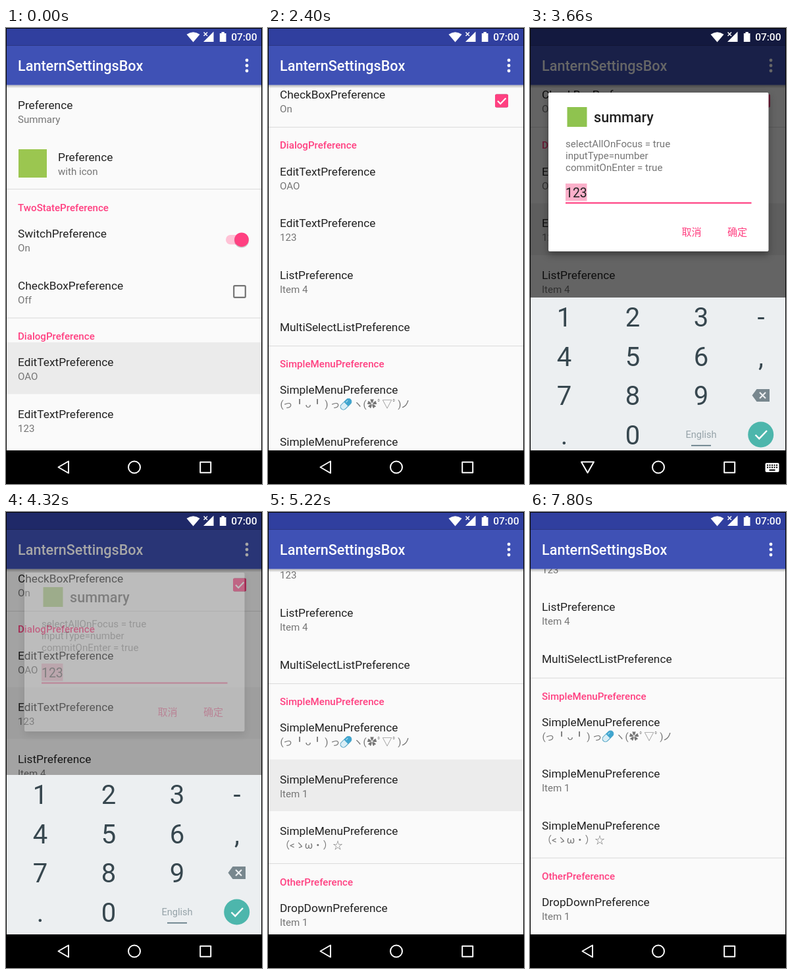
An HTML page for the animation above (8 s loop, 389 by 692 pixels).

```html
<!DOCTYPE html>
<html lang="en">
<head>
<meta charset="utf-8">
<title>Settings list</title>
<style>
html, body { margin: 0; width: 100%; height: 100%; overflow: hidden; background: #000; }
svg { display: block; }
text { font-family: Roboto, "Noto Sans CJK SC", "Noto Sans CJK JP", "DejaVu Sans", sans-serif; font-size: 15.1px; }
.title { font-size: 17.3px; fill: #212121; }
.sum { fill: #757575; }
.cat { font-weight: 500; fill: #ff4081; }
.head { font-size: 21.6px; font-weight: 500; }
.mid { text-anchor: middle; }
.key { font-size: 40px; fill: #37474f; text-anchor: middle; }
.lifted { filter: drop-shadow(0 5px 6px rgba(0,0,0,.35)); }
.menu { filter: drop-shadow(0 1px 2px rgba(0,0,0,.35)); }
</style>
</head>
<body>
<svg id="stage" width="389" height="692" viewBox="0 0 389 692"></svg>
<script>
const NS = 'http://www.w3.org/2000/svg';
const LOOP = 8000, STEP = 60, PINK = '#ff4081', ROW = 78.5;
const stage = document.getElementById('stage');

function set(node, attrs) {
  for (const k in attrs) node.setAttribute(k, attrs[k]);
  return node;
}
function add(parent, tag, attrs = {}, content) {
  const node = set(document.createElementNS(NS, tag), attrs);
  if (content !== undefined) node.textContent = content;
  parent.appendChild(node);
  return node;
}
const group = (parent, attrs) => add(parent, 'g', attrs);
const rect = (parent, x, y, width, height, fill, more) =>
  add(parent, 'rect', { x, y, width, height, fill, ...more });
const circle = (parent, cx, cy, r, fill, more) => add(parent, 'circle', { cx, cy, r, fill, ...more });
const path = (parent, d, fill, more) => add(parent, 'path', { d, fill, ...more });
const label = (parent, x, y, cls, content, more) =>
  add(parent, 'text', { x, y, class: cls, ...more }, content);
const move = (node, x, y) => set(node, { transform: `translate(${x} ${y})` });
const show = (node, alpha) => set(node, { opacity: alpha });

// Linear interpolation through [time, value] pairs
function at(t, keys) {
  if (t <= keys[0][0]) return keys[0][1];
  for (let i = 1; i < keys.length; i++) {
    const [t1, v1] = keys[i];
    if (t <= t1) {
      const [t0, v0] = keys[i - 1];
      return v0 + (v1 - v0) * (t - t0) / (t1 - t0);
    }
  }
  return keys[keys.length - 1][1];
}
function mix(a, b, k) {
  return `rgb(${a.map((v, i) => Math.round(v + (b[i] - v) * k))})`;
}

const defs = add(stage, 'defs');
function clip(id, x, y, w, h) {
  return rect(add(defs, 'clipPath', { id }), x, y, w, h);
}
clip('view', 1, 86, 387, 555);
clip('switchRow', 1, 282, 387, ROW);
const menuClip = clip('menuArea', 17, 191, 303, 225);
const shade = add(defs, 'linearGradient', { id: 'shade', x2: 0, y2: 1 });
add(shade, 'stop', { offset: 0, 'stop-color': '#000', 'stop-opacity': .28 });
add(shade, 'stop', { offset: 1, 'stop-color': '#000', 'stop-opacity': 0 });

// List
rect(stage, 1, 86, 387, 555, '#fafafa');
const list = group(group(stage, { 'clip-path': 'url(#view)' }));

function kaomoji(parent, x, y, cls) {
  const g = move(group(parent), x, y);
  const parts = [['(', 3], ['っ', 12], ['╹', 30], ['ᴗ', 43], ['╹', 57], [')', 71], ['っ', 84],
    ['ヽ', 119], ['(', 129], ['✿', 140], ['ﾟ', 152], ['▽', 163], ['ﾟ', 175], [')', 182], ['ノ', 191]];
  parts.forEach(([s, px]) => label(g, px, 0, cls + ' mid', s));
  const pill = set(group(g), { transform: 'translate(100.5 -5.5) rotate(-45)' });
  rect(pill, -10, -4.5, 20, 9, '#d9eef6', { rx: 4.5, stroke: '#4b9fc2', 'stroke-width': 1 });
  path(pill, 'M0-4.5H5.5A4.5 4.5 0 0 1 5.5 4.5H0Z', '#3fa5cf');
  path(pill, 'M2-2H6', 'none', { stroke: '#a5dcf0', 'stroke-width': 1.3 });
}

const rows = [
  [117, 'Preference', 'Summary'],
  [195.5, 'Preference', 'with icon', 79],
  [312, 'SwitchPreference', 'On'],
  [390.5, 'CheckBoxPreference', 'Off'],
  [507, 'EditTextPreference', 'OAO'],
  [585.5, 'EditTextPreference', '123'],
  [664, 'ListPreference', 'Item 4'],
  [743, 'MultiSelectListPreference', ''],
  [838.5, 'SimpleMenuPreference', ''],
  [917, 'SimpleMenuPreference', 'Item 1'],
  [995.5, 'SimpleMenuPreference', '（<ゝω・）☆'],
  [1112, 'DropDownPreference', 'Item 1']
].map(([y, title, summary, x = 18]) => {
  const glow = rect(list, 1, y - 30, 387, ROW, '#ebebeb', { opacity: 0 });
  label(list, x, y + 6.2, 'title', title);
  return { glow, sum: label(list, x, y + 27.3, 'sum', summary) };
});
kaomoji(list, 18, 865.8, 'sum');

[[272.3, 'TwoStatePreference'], [467.3, 'DialogPreference'],
 [799.5, 'SimpleMenuPreference'], [1073, 'OtherPreference']]
  .forEach(([y, s]) => label(list, 18, y + 5.4, 'cat', s));
[244, 439.5, 771.5, 1044.5].forEach(y => rect(list, 1, y, 387, 1.1, '#dcdcdc'));
rect(list, 19, 184, 43, 43, '#9bc650');

const ripple = circle(group(list, { 'clip-path': 'url(#switchRow)' }), 331, 321, 0, '#000');
const rail = rect(list, 334, 314, 27, 14.5, '#000', { rx: 7.2 });
const thumbShadow = circle(list, 0, 322.3, 11.2, '#000', { opacity: .2 });
const thumb = circle(list, 0, 321.2, 10.8, PINK);

rect(list, 346.2, 391.2, 17.6, 17.6, 'none', { rx: 1.5, stroke: '#757575', 'stroke-width': 2.2 });
const tick = group(list);
rect(tick, 345, 390, 20, 20, PINK, { rx: 2 });
path(tick, 'M349 400.3L353.2 404.5L361.4 396', 'none', { stroke: '#fff', 'stroke-width': 2.2 });

// Bars
rect(stage, 1, 86.5, 387, 5, 'url(#shade)');
rect(stage, 1, 1, 387, 25.5, '#303f9f');
rect(stage, 1, 26.5, 387, 60, '#3f51b5');
label(stage, 18, 65, 'head', 'LanternSettingsBox', { fill: '#fff' });
[49, 57, 65].forEach(y => circle(stage, 366, y, 2.4, '#fff'));
const dim = rect(stage, 1, 1, 387, 640, '#000');

// Dialog, drawn from its own top-left corner
const dialog = group(stage, { class: 'lifted' });
rect(dialog, 0, 0, 334.5, 241, '#fff', { rx: 2 });
rect(dialog, 28.5, 22, 30, 30, '#8fc34f');
label(dialog, 69, 45, 'head', 'summary', { fill: '#212121' });
['selectAllOnFocus = true', 'inputType=number', 'commitOnEnter = true']
  .forEach((s, i) => label(dialog, 26, 83.3 + i * 17.7, 'sum', s));
rect(dialog, 26, 138, 32.5, 26.5, '#fbb0ca');
label(dialog, 26, 158.9, 'title', '123', { style: 'font-size:19.4px' });
rect(dialog, 26, 166.4, 282.5, 2.2, PINK);
label(dialog, 217.5, 216.5, 'cat mid', '取消');
label(dialog, 287, 216.5, 'cat mid', '确定');

// Keyboard
const board = group(group(stage, { 'clip-path': 'url(#view)' }));
rect(board, 1, 399, 387, 242, '#eceff1');
['123-', '456,', '789', '.0'].forEach((line, r) =>
  [...line].forEach((s, c) => label(board, [52, 156, 260, 351][c], 443.3 + r * 59.4, 'key', s)));
path(board, 'M337.5 547.5L344.5 538H364V557H344.5Z', '#78878e');
path(board, 'M349 543L358 552M358 543L349 552', 'none', { stroke: '#eceff1', 'stroke-width': 2.2 });
label(board, 260, 611.5, 'mid', 'English', { fill: '#96a3a9', style: 'font-size:14.6px' });
rect(board, 245, 622.8, 30, 1.6, '#546e7a');
const enter = circle(board, 350.7, 607, 19.5, '#4db6ac');
path(board, 'M342.5 607.5L348.3 613.2L360 601', 'none', { stroke: '#fff', 'stroke-width': 2.4 });

// Popup menu
const menu = group(stage, { class: 'menu' });
const menuBox = group(menu, { 'clip-path': 'url(#menuArea)' });
rect(menuBox, 17, 191, 303, 225, '#fff');
rect(menuBox, 17, 303.5, 303, 52, '#eeeeee');
label(menuBox, 34, 231.6, 'title', '(｡･ω･｡)');
label(menuBox, 34, 283.5, 'title', '(*´∀`)~♥');
kaomoji(menuBox, 34, 335, 'title');
label(menuBox, 34, 387.2, 'title', '(・∀・)ノ');

// Status icons
path(stage, 'M274.5 9.8Q284.5 2.6 294.5 9.8L284.5 21.5Z', '#fff');
path(stage, 'M300 21L315.5 5.5V21Z', '#fff');
path(stage, 'M300.5 6.5L306 12M306 6.5L300.5 12', 'none', { stroke: '#fff', 'stroke-width': 1.5 });
path(stage, 'M324.8 8H327.5V6H331.8V8H334.5V21H324.8Z', '#fff');
label(stage, 381.5, 19.3, '', '07:00',
  { fill: '#fff', 'text-anchor': 'end', style: 'font-weight:500;font-size:15.5px' });

// Navigation bar
rect(stage, 0, 641, 389, 51, '#000');
const line = { stroke: '#fff', 'stroke-width': 2, 'stroke-linejoin': 'round' };
const back = path(stage, 'M79.5 666.5L95 657.5V675.5Z', 'none', line);
const ime = group(stage);
path(ime, 'M78 658.5H97L87.5 675Z', 'none', line);
rect(ime, 357.5, 660, 21, 14, '#fff', { rx: 2 });
for (let r = 0; r < 2; r++)
  for (let c = 0; c < 5; c++) rect(ime, 360 + c * 3.5, 662.5 + r * 3.3, 2, 2, '#000');
rect(ime, 363.5, 669.8, 9, 2, '#000');
circle(stage, 195, 666.5, 9, 'none', line);
rect(stage, 295.2, 658.7, 16, 16, 'none', line);

// Motion
const scroll = [[1080, 0], [1140, 12], [1200, 62], [1260, 78], [1320, 85], [1380, 88.5],
  [1920, 88.5], [1980, 105], [2040, 150], [2100, 196], [2160, 235], [2220, 262], [2280, 278],
  [2340, 286], [2400, 289.5], [5040, 289.5], [5100, 345], [5160, 455], [5220, 511.5], [5280, 520]];
const glows = {
  3: [[1440, 0], [1500, .6], [1620, 1], [1740, 1], [1860, .7], [2040, 0]],
  4: [[1080, 1], [1200, 0]],
  5: [[2880, 0], [2940, 1], [4260, 1], [4320, .5], [4440, 0]],
  9: [[5040, 0], [5100, 1], [5220, .9], [5280, 0]]
};
const dimKeys = [[2880, 0], [2940, .12], [3000, .35], [3060, .5], [3120, .6],
  [4200, .6], [4320, .35], [4500, 0]];
const dialogAlpha = [[2880, 0], [2940, .1], [3000, .5], [3060, .9], [3120, 1],
  [4200, 1], [4260, .65], [4320, .28], [4380, .05], [4440, 0]];
const dialogTop = [[3420, 213], [3480, 190], [3540, 150], [3600, 118], [3660, 98], [3720, 92]];
const boardDrop = [[3420, 242], [3480, 180], [3540, 100], [3600, 40], [3660, 10], [3720, 0],
  [4320, 0], [4380, 40], [4440, 120], [4500, 190], [4560, 242]];
const menuOpen = [[6180, 0], [6240, .3], [6300, .7], [6360, .93], [6420, 1]];
const menuAlpha = [[6180, 0], [6240, .7], [6300, 1], [7440, 1], [7500, .6], [7560, .25], [7620, 0]];

function draw(t) {
  move(list, 0, -at(t, scroll));
  for (const i in glows) show(rows[i].glow, at(t, glows[i]));

  const off = at(t, [[480, 0], [540, .15], [600, .55], [660, .88], [720, 1]]);
  const cx = 358 - 21 * off;
  set(thumb, { cx, fill: mix([255, 64, 129], [236, 236, 236], off) });
  set(thumbShadow, { cx });
  set(rail, { x: 334 - off, fill: mix([255, 194, 214], [185, 185, 185], off) });
  set(ripple, {
    r: at(t, [[480, 8], [660, 38]]),
    opacity: at(t, [[480, 0], [540, .05], [660, .06], [840, 0]])
  });
  rows[2].sum.textContent = t < 540 ? 'On' : 'Off';

  rows[3].sum.textContent = t < 1560 ? 'Off' : 'On';
  show(tick, at(t, [[1500, 0], [1560, .2], [1680, .8], [1740, 1]]));

  show(dim, at(t, dimKeys));
  show(dialog, at(t, dialogAlpha));
  move(dialog, 28, at(t, dialogTop));
  move(board, 0, at(t, boardDrop));
  set(enter, { fill: t >= 4080 && t < 4200 ? '#3f978f' : '#4db6ac' });

  const typing = t >= 3060 && t < 4260;
  show(back, typing ? 0 : 1);
  show(ime, typing ? 1 : 0);

  const open = at(t, menuOpen);
  const top = 303.5 + (191 - 303.5) * open, bottom = 355.5 + (416 - 355.5) * open;
  set(menuClip, { y: top, height: bottom - top });
  show(menu, at(t, menuAlpha));
}

const start = performance.now();
function tickFrame() {
  const t = (performance.now() - start) % LOOP;
  draw(Math.floor(t / STEP) * STEP);
  requestAnimationFrame(tickFrame);
}
tickFrame();
</script>
</body>
</html>
```
